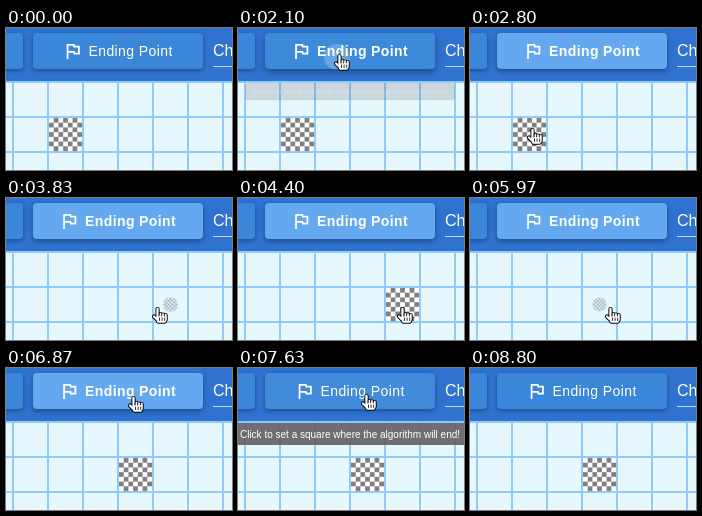
An HTML page with a canvas that plays this animation: 226x142 px, repeating every 9430 ms.

```html
<!DOCTYPE html>
<html lang="en">
<head>
<meta charset="utf-8">
<title>Ending Point</title>
<style>
  html, body { margin: 0; width: 100%; height: 100%; overflow: hidden; background: #e6f7fe; }
  canvas { display: block; width: 226px; height: 142px; }
</style>
</head>
<body>
<canvas id="stage"></canvas>
<script>
const W = 226, H = 142, LOOP = 9430, CELL = 35;
const SELECT = 2030, DESELECT = 7200;
const FONT = '"Liberation Sans", Arial, sans-serif';
const LINE = '#90caf9';
const canvas = document.getElementById('stage');
const ctx = canvas.getContext('2d');
const ratio = window.devicePixelRatio || 1;
canvas.width = W * ratio;
canvas.height = H * ratio;

const clamp = v => Math.max(0, Math.min(1, v));
const mix = (a, b, k) => a + (b - a) * k;
const progress = (t, from, length) => clamp((t - from) / length);
const smooth = k => k * k * (3 - 2 * k);

function bezier(x1, y1, x2, y2) {
  const at = (a, b, s) => 3 * a * s * (1 - s) ** 2 + 3 * b * s * s * (1 - s) + s ** 3;
  return x => {
    let lo = 0, hi = 1;
    for (let i = 0; i < 20; i++) {
      const mid = (lo + hi) / 2;
      if (at(x1, x2, mid) < x) lo = mid; else hi = mid;
    }
    return at(y1, y2, (lo + hi) / 2);
  };
}
const ease = bezier(.25, .1, .25, 1);
const standard = bezier(.4, 0, .2, 1);
const power = p => k => k ** p;

// Pointer trips: begin, end, target x, target y, easing
const TRIPS = [
  [1330, 1830, 96, 26, smooth],
  [2420, 2890, 53, 108, smooth],
  [3100, 4030, 169, 109, power(.9)],
  [4070, 5000, 51, 107, power(2.4)],
  [5030, 5650, 169, 109, smooth],
  [5720, 6030, 122, 109, power(1.5)],
  [6400, 6920, 122, 26, smooth],
  [7600, 8060, 228, 22, smooth]
];

function pointerAt(t) {
  let x = 118, y = 119;
  for (const [from, to, tx, ty, easing] of TRIPS) {
    const k = easing(progress(t, from, to - from));
    x = mix(x, tx, k);
    y = mix(y, ty, k);
  }
  return [x, y];
}

// While dragged, the end square follows the fingertip with a short lag
const moves = [{ time: -1000, col: 1 }];
for (let t = 3000; t < 6200; t += 2) {
  const col = Math.floor((pointerAt(t)[0] - 2) / CELL);
  if (col !== moves[moves.length - 1].col) moves.push({ time: t + 15, col });
}

function roundBox(x, y, w, h, r) {
  ctx.beginPath();
  ctx.roundRect(x, y, w, h, r);
}

function text(str, x, y, font, spacing = 0) {
  ctx.font = font + ' ' + FONT;
  ctx.letterSpacing = spacing + 'px';
  ctx.fillText(str, x, y);
}

function drawGrid() {
  ctx.fillStyle = '#e6f7fe';
  ctx.fillRect(0, 0, W, H);
  ctx.fillStyle = LINE;
  for (let x = 6; x < W; x += CELL) ctx.fillRect(x, 53, 2, H);
  for (let y = 53; y < H; y += CELL) ctx.fillRect(0, y, W, 2);
}

function drawEnd(t) {
  const { time, col } = moves.filter(m => m.time <= t).pop();
  const p = progress(t, time, 250);
  const grow = ease(clamp(p / .75));
  const scale = p < .75 ? mix(.3, 1.2, grow) : mix(1.2, 1, ease((p - .75) / .25));
  const round = mix(.5, 0, grow);
  ctx.save();
  ctx.translate(24.5 + CELL * col, 106.5);
  ctx.scale(scale, scale);
  ctx.globalAlpha = mix(.5, 1, grow);
  ctx.fillStyle = LINE;
  roundBox(-17.5, -17.5, 35, 35, 35 * round);
  ctx.fill();
  roundBox(-16.5, -16.5, 33, 33, 33 * round);
  ctx.clip();
  ctx.fillStyle = '#fff';
  ctx.fillRect(-17, -17, 34, 34);
  ctx.fillStyle = '#808080';
  const n = 7, s = 33 / n;
  for (let row = 0; row < n; row++)
    for (let c = (row + 1) % 2; c < n; c += 2)
      ctx.fillRect(-16.5 + c * s, -16.5 + row * s, s, s);
  ctx.restore();
}

function button(x, w, color, lift = 0) {
  ctx.save();
  ctx.shadowColor = 'rgba(0,0,0,.35)';
  ctx.shadowBlur = (4 + 3 * lift) * ratio;
  ctx.shadowOffsetY = (1.5 + 1.5 * lift) * ratio;
  ctx.fillStyle = color;
  roundBox(x, 5, w, 36, 4);
  ctx.fill();
  ctx.restore();
}

function drawRipple(t, start, x, y) {
  const fade = standard(progress(t, start + 130, 550));
  if (t < start || fade >= 1) return;
  ctx.save();
  roundBox(27, 5, 170, 36, 4);
  ctx.clip();
  ctx.fillStyle = `rgba(255,255,255,${.22 * (1 - fade)})`;
  ctx.beginPath();
  ctx.arc(x, y, 115 * standard(progress(t, start, 550)), 0, 7);
  ctx.fill();
  ctx.restore();
}

function drawFlag(x, y, size) {
  ctx.save();
  ctx.translate(x, y);
  ctx.scale(size / 24, size / 24);
  ctx.lineWidth = 2;
  ctx.strokeStyle = '#fff';
  ctx.stroke(new Path2D('M6 21V5H13.2L13.6 7H19V15H13.8L13.4 13H6'));
  ctx.restore();
}

function drawHeader(t) {
  ctx.fillStyle = '#2f72d0';
  ctx.fillRect(0, 0, W, 53);
  const active = t >= SELECT && t < DESELECT;
  const lit = standard(progress(t, SELECT + 30, 250)) - standard(progress(t, DESELECT + 30, 250));
  const press = [SELECT, DESELECT].some(c => t >= c && t < c + 130) ? 1 : 0;
  const shade = (a, b) => Math.round(mix(a, b, lit));
  button(-40, 57, '#3a87d9');
  button(27, 170, `rgb(${shade(58, 100)},${shade(135, 168)},${shade(217, 240)})`, Math.max(lit * .5, press));
  drawRipple(t, SELECT - 32, 99, 29);
  drawRipple(t, DESELECT - 10, 127, 30);

  drawFlag(active ? 52.8 : 56.3, 12.5, 21);
  ctx.fillStyle = '#fff';
  text('Ending Point', active ? 79 : 82.5, 28, active ? 'bold 14px' : '14px', .4);
  text('Ch', 207, 28, '16px');

  const hover = t >= 7980 && t < 8730;
  ctx.fillStyle = hover ? '#fff' : 'rgba(255,255,255,.7)';
  ctx.fillRect(207, hover ? 36 : 38, 19, hover ? 2 : 1);
}

function drawTip(t, open, close) {
  if (t < open || t > close + 175) return;
  const leaving = t >= close;
  const size = leaving ? 1 - standard(progress(t, close + 58, 116)) : standard(progress(t, open, 116));
  const s = mix(.75, 1, size);
  ctx.save();
  ctx.globalAlpha = leaving ? 1 - standard(progress(t, close, 174)) : standard(progress(t, open, 174));
  ctx.translate(112, 55);
  ctx.scale(s, s * s);
  ctx.fillStyle = 'rgba(97,97,97,.9)';
  roundBox(-118, 0, 236, 22, 4);
  ctx.fill();
  ctx.fillStyle = '#fff';
  ctx.textAlign = 'center';
  text('Click to set a square where the algorithm will end!', 0, 14.5, '10px');
  ctx.restore();
}

// Hand built from round strokes: index, three knuckles, thumb and palm
function drawPointer(t) {
  if (t < TRIPS[0][0]) return;
  const [x, y] = pointerAt(t);
  if (x > W) return;
  const hand = new Path2D('M5.5 2V13M2 9.5L5.5 13');
  const creases = new Path2D();
  for (let i = 0; i < 3; i++) {
    const fx = 8.4 + 2.6 * i;
    hand.moveTo(fx, 7 + i * .5);
    hand.lineTo(fx, 13);
    creases.moveTo(fx - 1.3, 6.5 + i * .4);
    creases.lineTo(fx - 1.3, 8.5);
    creases.moveTo(fx - .9, 11);
    creases.lineTo(fx - .9, 13.5);
  }
  hand.rect(6.2, 11, 6.6, 3.6);
  ctx.save();
  ctx.translate(Math.round(x), Math.round(y));
  ctx.lineCap = ctx.lineJoin = 'round';
  for (const [color, width] of [['#000', 4.2], ['#fff', 2.3]]) {
    ctx.strokeStyle = ctx.fillStyle = color;
    ctx.lineWidth = width;
    ctx.stroke(hand);
    ctx.fill(hand);
  }
  ctx.strokeStyle = '#000';
  ctx.lineWidth = .8;
  ctx.stroke(creases);
  ctx.restore();
}

const begin = performance.now();
function frame() {
  const t = (performance.now() - begin) % LOOP;
  ctx.setTransform(ratio, 0, 0, ratio, 0, 0);
  drawGrid();
  drawEnd(t);
  drawHeader(t);
  drawTip(t, SELECT + 28, 2530);
  drawTip(t, DESELECT, 7900);
  drawPointer(t);
  requestAnimationFrame(frame);
}
frame();
</script>
</body>
</html>
```
